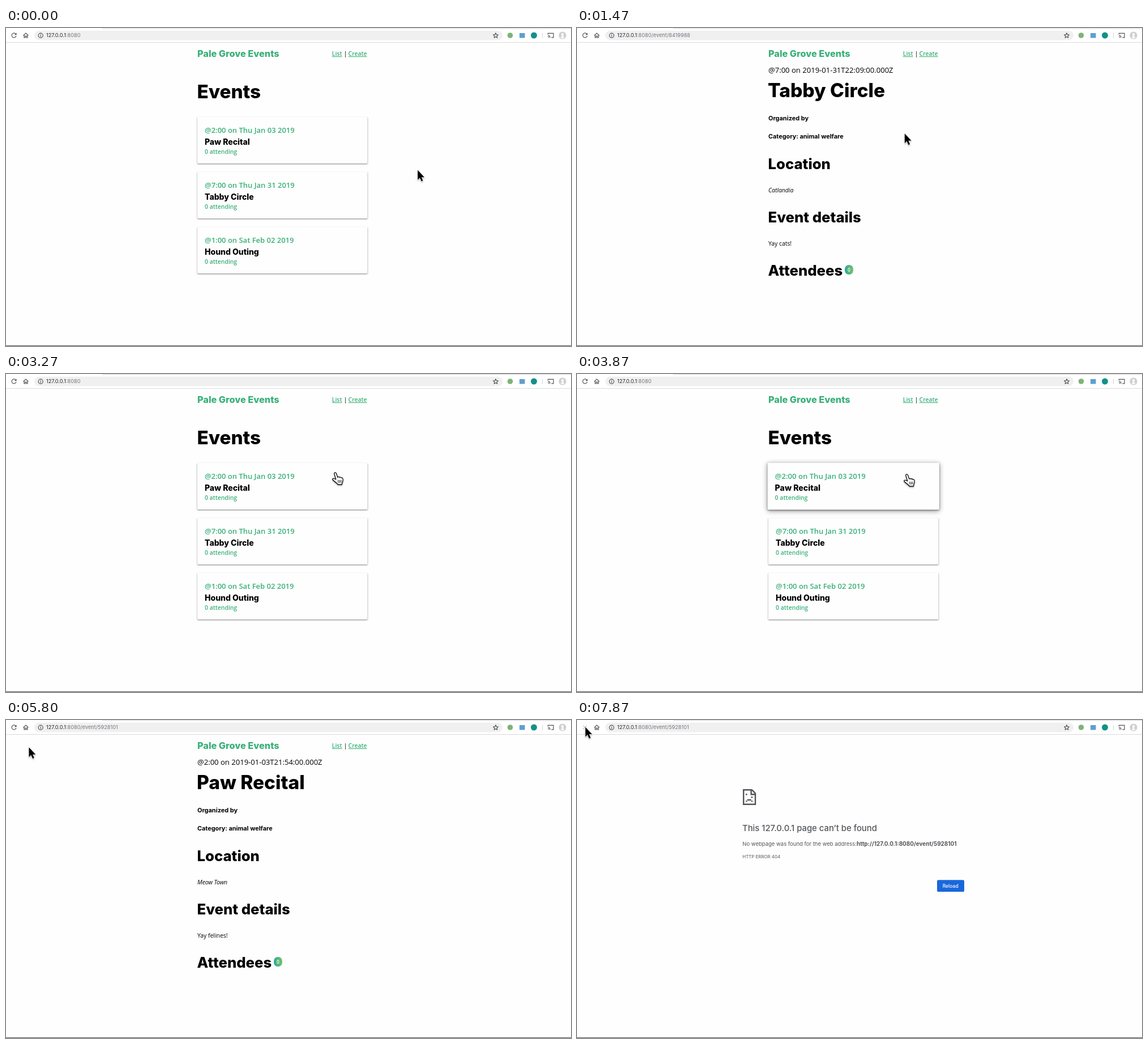
Recreate the animation shown at these times as an HTML page. Size 998 px wide and 561 px high, loop 8000 ms.

```html
<!DOCTYPE html>
<html lang="en">
<head>
<meta charset="utf-8">
<title>Events</title>
<style>
html, body { margin: 0; width: 100%; height: 100%; overflow: hidden; background: #fefefe; }
svg { display: block; width: 998px; height: 561px; font-optical-sizing: none; }
text { white-space: pre; }
.head { font-family: Inter, sans-serif; font-weight: 800; }
.bold { font-weight: 700; }
.body { font-family: "Open Sans", sans-serif; }
.ui { font-family: Inter, Roboto, sans-serif; }
.semi { font-weight: 600; }
.green { fill: #39b078; }
.link { fill: #39b078; text-decoration: underline; }
.icon { fill: none; stroke: #50545a; stroke-width: 1.2; }
</style>
</head>
<body>
<svg id="stage" viewBox="0 0 998 561" xmlns="http://www.w3.org/2000/svg"></svg>
<script>
const LOOP = 8000, STEP = LOOP / 120;
const clamp = v => Math.max(0, Math.min(1, v));
const text = (x, y, size, cls, str, extra = '') =>
  `<text x="${x}" y="${y}" font-size="${size}" class="${cls}" ${extra}>${str}</text>`;

const events = [
  { name: 'Paw Recital', when: '@2:00 on Thu Jan 03 2019', stamp: '@2:00 on 2019-01-03T21:54:00.000Z',
    id: '5928101', place: 'Meow Town', info: 'Yay felines!' },
  { name: 'Tabby Circle', when: '@7:00 on Thu Jan 31 2019', stamp: '@7:00 on 2019-01-31T22:09:00.000Z',
    id: '8419988', place: 'Catlandia', info: 'Yay cats!' },
  { name: 'Hound Outing', when: '@1:00 on Sat Feb 02 2019' }
];

const siteNav =
  text(338, 51, 16.3, 'head green', 'Pale Grove Events') +
  text(575.8, 49, 10.4, 'body semi link', 'List') +
  text(596.4, 49, 10.4, 'body', '|') +
  text(604.6, 49, 10.4, 'body semi link', 'Create');

const card = (e, i) => {
  const y = 157 + 97 * i;
  return `<g class="card">
    <rect class="lift" x="338" y="${y}" width="300.5" height="82" rx="1" fill="#000" filter="url(#blur)" transform="translate(0 2)" opacity="0"/>
    <rect x="338" y="${y + 1}" width="300.5" height="82" rx="1" fill="#000" opacity=".5" filter="url(#soft)"/>
    <rect x="338" y="${y}" width="300.5" height="82" rx="1" fill="#fefefe"/>
    ${text(351, y + 28, 13, 'body semi green', e.when)}
    ${text(351, y + 49, 14, 'head', e.name)}
    ${text(351, y + 64.7, 10.4, 'body semi green', '0 attending')}
  </g>`;
};

const detail = e =>
  text(338, 79, 13.05, 'body', e.stamp) +
  text(337, 122, 33.5, 'head', e.name) +
  text(338, 162.5, 10.95, 'head bold', 'Organized by') +
  text(338, 195, 10.85, 'head bold', 'Category: animal welfare') +
  text(337.5, 249, 25.7, 'head', 'Location') +
  text(338, 289.5, 10.4, 'body', e.place, 'font-style="italic"') +
  text(337.5, 343, 25.7, 'head', 'Event details') +
  text(338, 383.5, 10.4, 'body', e.info) +
  text(337.5, 436.5, 25.7, 'head', 'Attendees') +
  `<rect x="473" y="418" width="15" height="17" rx="7.2" fill="url(#badge)"/>` +
  text(480.5, 429.6, 8.5, 'body semi', '0', 'fill="#fff" text-anchor="middle"');

const errorPage = `<g fill="#53565a">
  <path d="M309 123.2H294.2V148.8H315V131.2H307.6V123.2M309 123.2L315 129.4V132" fill="none" stroke="#505256" stroke-width="2.4"/>
  <path d="M298 130h2.6v2.6h-2.6zM307.6 135h2.6v2.6h-2.6zM300.6 139.8h7.2v2.4h-7.2zM298.2 142.2h2.4v2.4h-2.4zM307.8 142.2h2.4v2.4h-2.4z"/>
  ${text(292, 195.5, 14.85, 'ui', 'This 127.0.0.1 page can’t be found', 'font-weight="500"')}
  ${text(292.3, 221.7, 9.5, 'ui', 'No webpage was found for the web address:')}
  ${text(494, 221.7, 9.95, 'ui', 'http://127.0.0.1:8080/event/5928101', 'font-weight="700"')}
  ${text(292.3, 244, 7.9, 'ui', 'HTTP ERROR 404')}
  <rect x="636" y="282.3" width="48" height="20.8" rx="2.2" fill="#1967dc"/>
  ${text(659.7, 296, 8.6, 'ui', 'Reload', 'fill="#fff" font-weight="500" text-anchor="middle"')}
</g>`;

const toolbar = `
  <rect width="998" height="25" fill="#fff"/>
  <rect x="170" width="828" height="1.4" fill="#dfe1e4"/>
  <rect y="25" width="998" height="1" fill="#dadada"/>
  <rect x="50" y="4.8" width="827" height="16.6" rx="8.3" fill="#f0f0f1"/>
  <g id="reload"><path class="icon" d="M17.3 10.4A4 4 0 1 0 18 14"/><path d="M18.6 8.4V12.2H14.8Z" fill="#50545a"/></g>
  <path id="stop" class="icon" d="M10.8 9.8l6.4 6.4M17.2 9.8l-6.4 6.4"/>
  <path class="icon" d="M30.6 13.2L35 9l4.4 4.2M32 12.4V17h2v-3h2v3h2V12.4"/>
  <circle class="icon" cx="61.2" cy="13.2" r="4"/>
  <path class="icon" d="M61.2 12.6V15.6M61.2 10.7V11.8"/>
  <text class="ui" x="71" y="16.4" font-size="9.2" fill="#25282b">127.0.0.1<tspan fill="#74777b" id="path"></tspan></text>
  <path class="icon" stroke-linejoin="round" d="M865 8.8l1.3 2.9 3.1.3-2.4 2.1.8 3.1-2.8-1.7-2.8 1.7.8-3.1-2.4-2.1 3.1-.3Z"/>
  <circle cx="890.5" cy="13" r="4.8" fill="#7fb376"/>
  <rect x="907" y="9" width="9.5" height="8.5" fill="#5f9fd0"/>
  <circle cx="932.5" cy="13" r="5.5" fill="#129287"/>
  <path d="M947.5 8.5V18" stroke="#d4d4d4"/>
  <path class="icon" d="M957.3 11.4V9.4H967V16.8H963.4M957.3 13.2A3.8 3.8 0 0 1 961 17M957.3 15.4A1.6 1.6 0 0 1 958.9 17"/>
  <circle cx="983" cy="13" r="6.6" fill="#cfcfcf"/>
  <path d="M983 8.8a2.3 2.7 0 0 1 1.1 5v1.2l2.4 1.8a5 5 0 0 1-7 0l2.4-1.8v-1.2a2.3 2.7 0 0 1 1.1-5Z" fill="#fff"/>`;

const pointers = `
  <g id="pointer" filter="url(#drop)">
    <path id="arrow" d="M.8 .5V17.6L4.6 14L7.4 20.4L10.1 19.2L7.4 13H12.6Z" fill="#000" stroke="#fff" stroke-width="1" paint-order="stroke"/>
    <g id="hand" stroke="#111" stroke-width="1.3" stroke-linejoin="round" stroke-linecap="round">
      <path fill="#fff" d="M1.8 12L-1 2.6C-1.7-.2 1.4-1.2 2.4 1.4L4.8 8.2C5.4 6.9 7.5 7.1 8 8.5C8.9 7.5 10.8 7.9 11.1 9.3C12.3 8.6 13.8 9.3 14 10.7C14.6 14 13.8 16.5 12.6 18.5L12.4 21H5.2C4.2 18.4 .2 16.8-3.8 12.8C-5 11.2-3.2 9.7-1.5 10.5Z"/>
      <path fill="none" stroke-width="1" d="M5.6 13.5l.4 4M8.2 13.3l.2 4.2M10.8 13.3l0 4"/>
    </g>
  </g>`;

document.getElementById('stage').innerHTML = `
  <defs>
    <filter id="blur" x="-10%" y="-30%" width="120%" height="160%"><feGaussianBlur stdDeviation="4.5"/></filter>
    <filter id="soft" x="-5%" y="-10%" width="110%" height="120%"><feGaussianBlur stdDeviation="1"/></filter>
    <filter id="drop" x="-50%" y="-50%" width="200%" height="200%"><feDropShadow dx="0" dy="1.5" stdDeviation="1.3" flood-opacity=".35"/></filter>
    <linearGradient id="badge"><stop stop-color="#2fa79c"/><stop offset="1" stop-color="#74c365"/></linearGradient>
  </defs>
  <rect width="998" height="561" fill="#fefefe"/>
  <g id="nav">${siteNav}</g>
  <g class="view">${text(337.5, 124, 33.2, 'head', 'Events')}${events.map(card).join('')}</g>
  <g class="view">${detail(events[0])}</g>
  <g class="view">${detail(events[1])}</g>
  <g class="view">${errorPage}</g>
  ${toolbar}
  <rect y="559.8" width="998" height="1.2" fill="#6b6b6b"/>
  ${pointers}`;

const $ = id => document.getElementById(id);
const views = [...document.querySelectorAll('.view')];
const cards = [...document.querySelectorAll('.card')];
const show = (el, on) => el.setAttribute('display', on ? 'inline' : 'none');

const LIST = 0, FIRST = 1, SECOND = 2, ERROR = 3, BLANK = 4;
const pages = [[0, LIST], [930, SECOND], [2470, LIST], [4070, FIRST], [7270, BLANK], [7600, ERROR]];
const hands = [[320, 930], [1930, 2600], [3190, 4070]];
const hovers = [[3260, 4070], [320, 930]];

// time, x, y of the pointer's hot spot
const track = [
  [0, 727, 250], [130, 708, 255], [330, 622, 271], [530, 568, 282], [1000, 569, 282],
  [1200, 573, 250], [1470, 578, 186], [1730, 583, 95], [1950, 585, 50], [2200, 585, 45],
  [2500, 585, 45], [2730, 584, 70], [3070, 582, 145], [3270, 581, 174], [3600, 582, 177],
  [4730, 582, 177], [4870, 555, 172], [5070, 440, 155], [5330, 210, 114], [5530, 86, 85],
  [5660, 62, 66], [5800, 40, 48], [6070, 22, 25], [6400, 14, 13], [6670, 14, 12]
];

function pointerAt(t) {
  const i = track.findIndex(k => k[0] > t);
  if (i < 0) return track[track.length - 1].slice(1);
  const [a, b] = [track[i - 1], track[i]];
  const p = (t - a[0]) / (b[0] - a[0]);
  return [a[1] + (b[1] - a[1]) * p, a[2] + (b[2] - a[2]) * p];
}

function render(t) {
  const page = pages.filter(p => p[0] <= t).pop()[1];
  views.forEach((v, i) => show(v, i === page));
  show($('nav'), page < ERROR);
  $('path').textContent = ':8080' +
    (page === LIST ? '' : '/event/' + events[page === SECOND ? 1 : 0].id);

  hovers.forEach(([from, to], i) => {
    const p = t < to ? clamp((t - from) / 200) : 0;
    const s = 1 + 0.01 * p, cx = 488.3, cy = 198 + 97 * i;
    cards[i].setAttribute('transform', `translate(${cx} ${cy}) scale(${s}) translate(${-cx} ${-cy})`);
    cards[i].querySelector('.lift').setAttribute('opacity', 0.42 * p);
  });

  show($('reload'), t < 6870);
  show($('stop'), t >= 6870);
  $('stop').style.stroke = t < 7270 ? '#50545a' : '#bcbec0';

  const onLink = hands.some(([a, b]) => t >= a && t < b);
  show($('hand'), onLink);
  show($('arrow'), !onLink);
  const [x, y] = pointerAt(t);
  $('pointer').setAttribute('transform', `translate(${x.toFixed(2)} ${y.toFixed(2)})`);
}

const start = performance.now();
function frame() {
  const t = (performance.now() - start) % LOOP;
  render(Math.min(LOOP - 1, Math.floor((t + 4) / STEP) * STEP + 4));
  requestAnimationFrame(frame);
}
frame();
</script>
</body>
</html>
```
